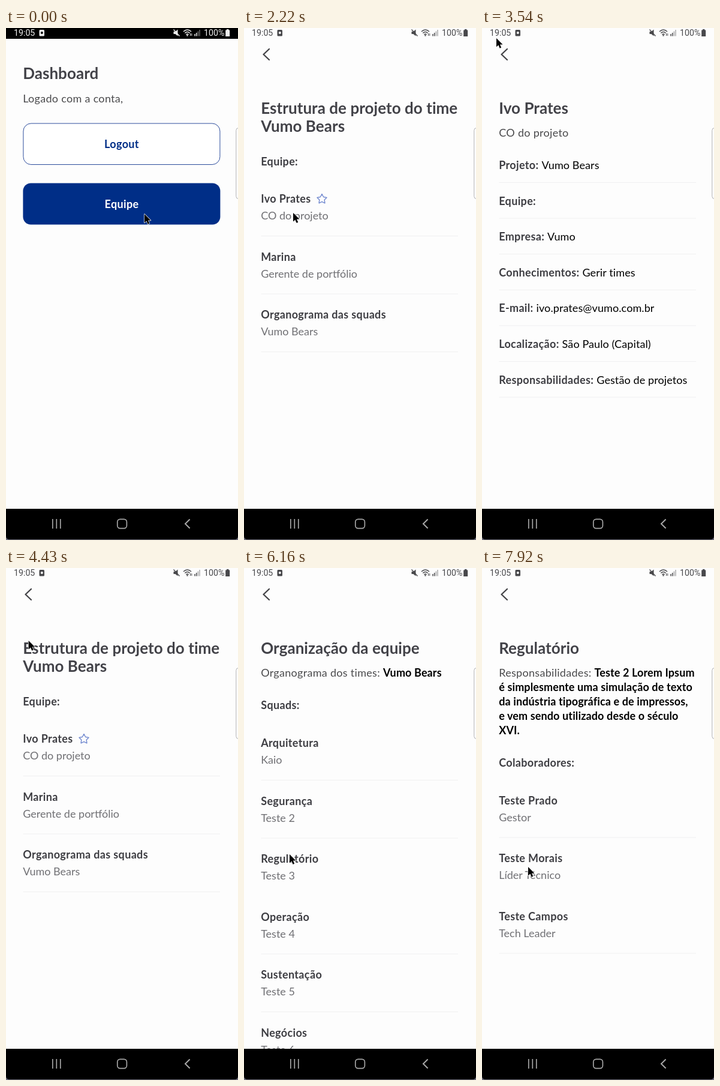
An HTML page that plays this animation: 387x853 px, repeating every 8 s.

```html
<!DOCTYPE html>
<html lang="pt-BR">
<head>
<meta charset="utf-8">
<title>Equipe</title>
<style>
  html, body { margin: 0; width: 100%; height: 100%; overflow: hidden; background: #fdfdfd; }
  svg { display: block; width: 100%; height: 100%; }
  text { font: 400 18px Lato, sans-serif; letter-spacing: .3px; fill: #4a4a4c; }
  .b { font-weight: 700; letter-spacing: .35px; fill: #3d3d42; }
  .h { font-size: 26px; font-weight: 700; letter-spacing: .05px; fill: #424248; }
  .s { letter-spacing: 0; fill: #707074; }
  .k { letter-spacing: .1px; fill: #000; }
  .kb { font-weight: 700; letter-spacing: .12px; fill: #000; }
  .status text { font: 400 14.2px Roboto, sans-serif; letter-spacing: 0; fill: currentColor; }
</style>
</head>
<body>
<svg id="stage" viewBox="0 0 387 853" xmlns="http://www.w3.org/2000/svg"></svg>
<script>
const LOOP = 8000;
const TEAM = 'Vumo Bears';
const LEAD = 'Ivo Prates';
const PITCH = 96.5;

const text = (y, str, cls = '') => `<text x="28.2" y="${y}" class="${cls}">${str}</text>`;
const span = (str, cls) => `<tspan class="${cls}">${str}</tspan>`;
const rule = y => `<path d="M28.5 ${y}H357" stroke="#f0f0f1"/>`;
const back = '<path d="M42 35l-9.5 9 9.5 9" fill="none" stroke="#444448" stroke-width="2.3" stroke-linecap="round" stroke-linejoin="round"/>';

// Two-line list; `ids` names the tappable rows, `bare` is the row without a rule.
function list(y, rows, ids = {}, bare) {
  return rows.map(([name, role], i) => {
    const top = y + i * PITCH;
    return `<g${ids[i] ? ` id="${ids[i]}"` : ''}>` +
      text(top, name, 'b') + text(top + 28, role, 's') + '</g>' +
      (i === bare ? '' : rule(top + 55.5));
  }).join('');
}

function star(cx, cy, r) {
  const pts = Array.from({ length: 10 }, (_, i) => {
    const a = i * Math.PI / 5 - Math.PI / 2, d = i % 2 ? r * .52 : r;
    return (cx + d * Math.cos(a)).toFixed(1) + ',' + (cy + d * Math.sin(a)).toFixed(1);
  });
  return `<polygon points="${pts.join(' ')}" fill="none" stroke="#7088cf" stroke-width="1.4" stroke-linejoin="round"/>`;
}

const fields = [
  ['Projeto', TEAM], ['Equipe', ''], ['Empresa', 'Vumo'], ['Conhecimentos', 'Gerir times'],
  ['E-mail', 'ivo.prates@vumo.com.br'], ['Localização', 'São Paulo (Capital)'],
  ['Responsabilidades', 'Gestão de projetos']
];

const squads = ['Arquitetura', 'Segurança', 'Regulatório', 'Operação', 'Sustentação', 'Negócios']
  .map((name, i) => [name, i ? `Teste ${i + 1}` : 'Kaio']);

const pages = {
  home: text(85, 'Dashboard', 'h') + text(123.5, 'Logado com a conta,') +
    `<rect x="28.9" y="159" width="328" height="68.5" rx="13" fill="#fff" stroke="#2c4c9c"/>
     <text x="193" y="199.5" text-anchor="middle" class="b" style="fill:#002e87">Logout</text>
     <g id="equipe"><rect x="28.4" y="258.5" width="329" height="69" rx="13" fill="#002e87"/>
     <text x="193" y="299.5" text-anchor="middle" class="b" style="fill:#fff">Equipe</text></g>`,
  team: back + text(142.5, 'Estrutura de projeto do time', 'h') + text(172.5, TEAM, 'h') +
    text(228.5, 'Equipe:', 'b') + star(130, 285, 8.4) +
    list(291, [[LEAD, 'CO do projeto'], ['Marina', 'Gerente de portfólio'],
      ['Organograma das squads', TEAM]], { 0: 'lead', 2: 'chart' }),
  person: back + text(142.5, LEAD, 'h') + text(180.5, 'CO do projeto') +
    fields.map(([label, value], i) =>
      text(235 + i * 59.6, span(label + ':', 'b') + ' ' + span(value, 'k')) + rule(257.5 + i * 59.6)).join(''),
  org: back + text(142.5, 'Organização da equipe', 'h') +
    text(180.5, 'Organograma dos times: ' + span(TEAM, 'kb')) + text(235, 'Squads:', 'b') +
    list(298, squads, { 2: 'squad' }, 2),
  squad: back + text(142.5, 'Regulatório', 'h') +
    text(180.5, 'Responsabilidades: ' + span('Teste 2 Lorem Ipsum', 'kb')) +
    ['é simplesmente uma simulação de texto', 'da indústria tipográfica e de impressos,',
     'e vem sendo utilizado desde o século', 'XVI.'].map((s, i) => text(204.5 + i * 24, s, 'kb')).join('') +
    text(330.5, 'Colaboradores:', 'b') +
    list(393.5, [['Teste Prado', 'Gestor'], ['Teste Morais', 'Líder Técnico'], ['Teste Campos', 'Tech Leader']], {}, 1)
};

const statusBar = `<g class="status" id="status">
  <rect id="statusBg" width="387" height="18"/>
  <text x="13" y="13">19:05</text><text x="330" y="13">100%</text>
  <rect x="55.5" y="3" width="8.5" height="10.5" rx="1.5" fill="currentColor"/>
  <circle class="hole" cx="59.8" cy="8" r="2"/>
  <path d="M279.5 6h3l4-3.5v11l-4-3.5h-3z" fill="currentColor"/>
  <path d="M279.5 2.5l10 11" stroke="currentColor" stroke-width="1.3"/>
  <g fill="none" stroke="currentColor" stroke-width="1.4">
    <path d="M296 6q6.5-6 13 0M298.3 8.6q4.2-4 8.4 0M300.4 11q2.1-2 4.2 0"/></g>
  <circle cx="302.5" cy="12.4" r="1.2" fill="currentColor"/>
  <path d="M307.5 9v4M309.7 9v4" stroke="currentColor"/>
  <path d="M315 10v3.5M317.7 8v5.5" stroke="currentColor" stroke-width="1.5"/>
  <path d="M320.4 5.5v8M323 3v10.5" stroke="currentColor" stroke-width="1.4" opacity=".5"/>
  <path d="M368 2h3.5v1.4h1.7v10.6h-7V3.4H368z" fill="currentColor"/></g>`;

const navBar = `<rect y="840" width="387" height="13" fill="#6a6a78"/>
  <path d="M0 801H387V846q0 6-6 6H6q-6 0-6-6z"/>
  <g fill="none" stroke="#a6a6a6" stroke-width="1.7">
    <path d="M77.8 818v16M84.3 818v16M90.8 818v16"/>
    <rect x="185.8" y="818.3" width="15.6" height="15.4" rx="4.6"/>
    <path d="M306.6 818.5l-7.6 7.5 7.6 7.5" stroke-width="2"/></g>`;

const stage = document.getElementById('stage');
stage.innerHTML = '<rect width="387" height="853" fill="#fdfdfd"/>' +
  '<clipPath id="view"><rect width="387" height="801"/></clipPath><g clip-path="url(#view)">' +
  Object.entries(pages).map(([id, body]) =>
    `<g id="page-${id}"><rect width="387" height="801" fill="#fdfdfd"/>${body}</g>`).join('') + '</g>' +
  statusBar + navBar +
  '<rect x="383.8" y="166.5" width="12" height="118" rx="4" fill="#fbfbfb" stroke="#b4b4b6"/>' +
  '<path id="cursor" d="M0 0V14.6L3.4 11.5 5.6 16.8 8.2 15.7 6 10.5H10.5Z" stroke="#fff" stroke-width="1.3" stroke-linejoin="round" paint-order="stroke"/>';

const $ = id => document.getElementById(id);
const clamp = v => Math.max(0, Math.min(1, v));
const ease = v => v * v * (3 - 2 * v);

const ticks = [[0, 0, 1], [150, 150, 1], [450, 450, 1], [1030, 1030, 1], [1620, 2660, 8],
  [2950, 3990, 8], [4130, 5160, 8], [5310, 5860, 5], [6160, 6600, 4], [6890, 7620, 6], [7920, 7920, 1]]
  .flatMap(([a, b, n]) => Array.from({ length: n }, (_, i) => n > 1 ? a + (b - a) * i / (n - 1) : a));
const snap = t => ticks.filter(k => k <= t + 6).pop();

// Pointer: [time, x, y]
const path = [[0, 231, 310], [149, 231, 310], [150, 220, 301], [1500, 220, 301], [2220, 82, 308],
  [2400, 81, 308], [3000, 81, 308], [3540, 24, 17], [3800, 29, 32], [4200, 29, 32], [5010, 75, 506],
  [5900, 75, 506], [6160, 76, 477], [6600, 76, 481], [7180, 76, 481], [7600, 76, 497],
  [7900, 76, 497], [7920, 77, 498], [LOOP, 77, 498]];

function pointer(t) {
  const i = Math.max(1, path.findIndex(p => p[0] >= t));
  const [t0, x0, y0] = path[i - 1], [t1, x1, y1] = path[i];
  const p = ease(clamp((t - t0) / (t1 - t0)));
  return [x0 + (x1 - x0) * p, y0 + (y1 - y0) * p];
}

// Navigation: [start, duration, page, goes back]
const route = [[0, 1, 'home'], [1030, 1, 'team'], [2900, 300, 'person'], [4080, 300, 'team', true],
  [5320, 280, 'org'], [6990, 300, 'squad']];

// Touch feedback: [element, from, to]
const taps = [['equipe', 450, 1030], ['lead', 2510, 3300], ['chart', 5150, 5700], ['squad', 6880, 7400]];

function pose(id, opacity, scale) {
  const page = $('page-' + id);
  page.setAttribute('visibility', opacity > 0 ? 'visible' : 'hidden');
  page.setAttribute('opacity', opacity);
  page.setAttribute('transform', `translate(193.5 409) scale(${scale}) translate(-193.5 -409)`);
}

function draw(time) {
  const t = snap(time);
  const n = route.filter(r => r[0] <= t).length - 1;
  const [start, span, page, isBack] = route[n];
  const p = span > 1 ? clamp((t - start) / span) : 1;
  const zoom = .07 * ease(p);

  Object.keys(pages).forEach(id => pose(id, 0, 1));
  if (p < 1) {
    const prev = route[n - 1][2];
    if (isBack) pose(prev, 1 - p, 1 - zoom);
    else pose(prev, 1, 1 + zoom);
  }
  if (isBack) pose(page, 1, 1.07 - zoom);
  else pose(page, p, .93 + zoom);

  taps.forEach(([id, from, to]) => $(id).setAttribute('opacity', t >= from && t < to ? .2 : 1));

  const dark = page === 'home', bg = dark ? '#000' : '#fdfdfd';
  $('status').style.color = dark ? '#eee' : '#48484b';
  $('statusBg').setAttribute('fill', dark ? bg : 'none');
  document.querySelector('.hole').setAttribute('fill', bg);
  $('cursor').setAttribute('transform', `translate(${pointer(t)})`);
}

function frame() {
  draw(performance.now() % LOOP);
  requestAnimationFrame(frame);
}
draw(0);
requestAnimationFrame(frame);
</script>
</body>
</html>
```
